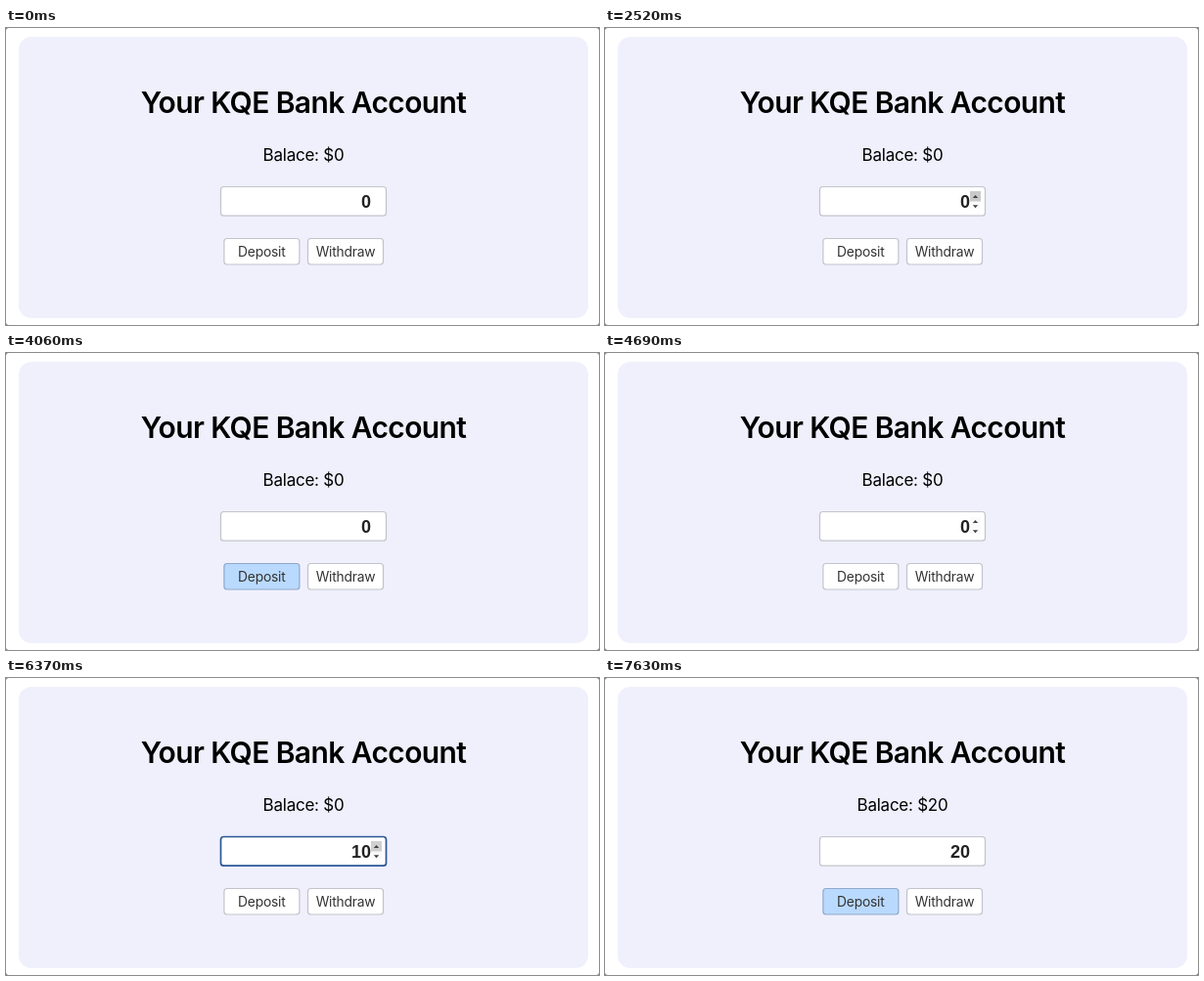
Animation of 606 by 304 pixels, one loop 8000 ms. Source, as an HTML page with a canvas:

```html
<!DOCTYPE html>
<html lang="en">
<head>
<meta charset="utf-8">
<title>Bank account</title>
<style>
  html, body { margin: 0; width: 100%; height: 100%; overflow: hidden; background: #fff; }
  canvas, svg { position: absolute; left: 0; top: 0; width: 606px; height: 304px; }
  text { font-family: Inter, sans-serif; text-anchor: middle; }
  .title { font-size: 30px; font-weight: 600; letter-spacing: -0.6px; }
  .balance { font-size: 17px; letter-spacing: -0.25px; }
  .amount { font: bold 18px "Liberation Sans", Arial, sans-serif; text-anchor: end; fill: #222; }
  .label { font-size: 13.8px; letter-spacing: -0.2px; fill: #333; }
</style>
</head>
<body>
<canvas width="606" height="304"></canvas>
<svg viewBox="0 0 606 304">
  <text class="title" x="304" y="87">Your KQE Bank Account</text>
  <text class="balance" id="balance" x="304" y="136"></text>
  <text class="amount" id="amount" x="373" y="184"></text>
  <text class="label" x="261.3" y="234">Deposit</text>
  <text class="label" x="347" y="234">Withdraw</text>
</svg>
<script>
const LOOP = 8000;
const ctx = document.querySelector('canvas').getContext('2d');
const balance = document.getElementById('balance');
const amount = document.getElementById('amount');

// Each track lists [start time, value]; a value holds until the next one.
const tracks = {
  hover: [[0, ''], [3430, 'deposit'], [4130, 'withdraw'], [4620, ''], [7000, 'deposit']],
  spinner: [[0, 'off'], [2520, 'hover'], [3080, 'idle'], [3150, 'off'],
            [4690, 'idle'], [4830, 'off'], [5180, 'idle'], [5250, 'hover'],
            [5810, 'press'], [5950, 'hover'], [6370, 'press'], [6580, 'hover'],
            [6930, 'idle'], [7350, 'off']],
  focus: [[0, 'none'], [5810, 'full'], [7350, 'fading'], [7490, 'none']],
  amount: [[0, 0], [5810, 10], [6440, 20]],
  balance: [[0, 0], [7630, 20]]
};
const borders = {
  none: ['#c3c3cb', 1.2],
  fading: ['#7f99c2', 1.4],
  full: ['#2a5796', 1.7]
};

function valueAt(track, time) {
  return track.filter(([start]) => start <= time).pop()[1];
}

function box(x, y, w, h, radius, fill, stroke, lineWidth = 1.2) {
  ctx.beginPath();
  ctx.roundRect(x, y, w, h, radius);
  ctx.fillStyle = fill;
  ctx.fill();
  if (!stroke) return;
  ctx.strokeStyle = stroke;
  ctx.lineWidth = lineWidth;
  ctx.stroke();
}

function arrow(y, tip) {
  ctx.beginPath();
  ctx.moveTo(375.8, y);
  ctx.lineTo(381.2, y);
  ctx.lineTo(378.5, tip);
  ctx.fillStyle = '#404040';
  ctx.fill();
}

function drawSpinner(state) {
  if (state === 'off') return;
  box(373, 168, 11, 17, 0, '#fafafa');
  if (state !== 'idle') box(373, 167, 11, 10.5, 0, state === 'press' ? '#d0d0d0' : '#c9c9c9');
  arrow(174, 171);
  arrow(181.3, 184.3);
}

function button(x, hovered) {
  box(x, 215.5, 77, 26.5, 3, hovered ? '#b9dafe' : '#fff', hovered ? '#8fa9c9' : '#c3c3cb');
}

function draw(time) {
  const now = {};
  for (const name in tracks) now[name] = valueAt(tracks[name], time);

  box(0, 0, 606, 304, 0, '#777');
  box(0, 0, 606, 304, 3, '#fff');
  box(13, 9, 582, 288, 13, '#f0f0fd');
  box(219.5, 162.5, 169, 29.7, 3, '#fff', ...borders[now.focus]);
  drawSpinner(now.spinner);
  button(222.9, now.hover === 'deposit');
  button(308.5, now.hover === 'withdraw');

  balance.textContent = 'Balace: $' + now.balance;
  amount.textContent = now.amount;
}

const began = performance.now();
function tick() {
  draw((performance.now() - began) % LOOP);
  requestAnimationFrame(tick);
}
tick();
</script>
</body>
</html>
```
